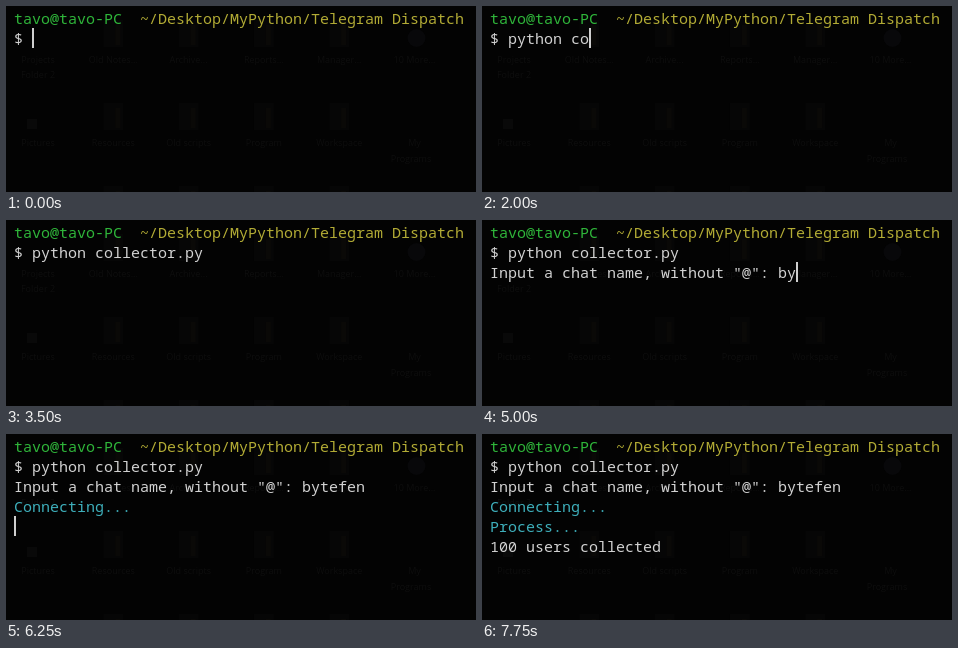
Recreate the animation shown at these times as an HTML page. Size 470 by 186 pixels, loop 8 s.

```html
<!DOCTYPE html>
<html lang="en">
<head>
<meta charset="utf-8">
<title>Terminal session</title>
<style>
  html, body { margin: 0; width: 470px; height: 186px; overflow: hidden; background: #030303; }
  svg { display: block; }
  text { white-space: pre; font: 15px "Noto Sans Mono", "DejaVu Sans Mono", monospace; fill: #d2d2d2; }
  .green { fill: #2fb53a; }
  .gold { fill: #b2ab35; }
  .cyan { fill: #3eafbb; }
  #desk text { font: 9px "Open Sans", sans-serif; fill: #0e0e0e; text-anchor: middle; }
</style>
</head>
<body>
<svg id="stage" width="470" height="186" viewBox="0 0 470 186">
  <g id="desk"></g>
  <g id="term"></g>
  <rect id="cursor" width="2" height="20" fill="#cfcfcf"/>
</svg>
<script>
const LOOP = 8000, LEFT = 8, CHAR = 9, PITCH = 20;
const NS = "http://www.w3.org/2000/svg";
const byId = id => document.getElementById(id);

function add(parent, tag, attrs, content = "") {
  const el = document.createElementNS(NS, tag);
  for (const key in attrs) el.setAttribute(key, attrs[key]);
  el.textContent = content;
  return parent.appendChild(el);
}

// Desktop icons dimly visible through the terminal
const desk = byId("desk");
const labels = [
  ["Projects", "Old Notes...", "Archive...", "Reports...", "Manager...", "10 More..."],
  ["Pictures", "Resources", "Old scripts", "Program", "Workspace", "My"],
  ["", "", "", "", "", ""]
];
labels.forEach((row, r) => row.forEach((label, c) => {
  const x = 32 + c * 75.3, y = 14 + r * 83;
  if (c > 0 && c < 5) {
    add(desk, "rect", { x: x - 10, y, width: 20, height: 27, fill: "#060606" });
    add(desk, "rect", { x: x + 2, y: y + 5, width: 5, height: 20, fill: "#0a0907" });
  } else if (c == 0 && r == 1) {
    add(desk, "rect", { x: x - 11, y: y + 16, width: 10, height: 10, fill: "#090909" });
  } else if (c == 5 && r == 0) {
    add(desk, "circle", { cx: x + 2, cy: y + 18, r: 9, fill: "#08080a" });
  }
  add(desk, "text", { x, y: y + 43 }, label);
}));
add(desk, "text", { x: 32, y: 72 }, "Folder 2");
add(desk, "text", { x: 405, y: 156 }, "Programs");

// Terminal lines
const term = byId("term");
const line = (row, cls, text = "", col = 0) => add(term, "text",
  { x: LEFT + col * CHAR, y: 18 + row * PITCH, class: cls }, text);

line(0, "green", "tavo@tavo-PC");
line(0, "gold", "~/Desktop/MyPython/Telegram Dispatch", 14);
const command = "python collector.py ";
const question = 'Input a chat name, without "@": ';
const chat = "bytefen";
const rows = [1, 2, 3, 4, 5].map(r => line(r, r == 3 || r == 4 ? "cyan" : ""));

// Steps are [time, value] pairs
const commandSteps = [[0, 0], [1250, 3], [1500, 5], [1750, 7], [2000, 9], [2250, 12], [2500, 20]];
const chatSteps = [[0, 0], [4750, 1], [5000, 2], [5500, 3], [5750, 5], [6000, 7]];
const rowSteps = [[0, 1], [3000, 2], [6250, 4], [7000, 5], [7250, 6]];
const blinks = [[500, 1000], [3500, 3750], [4250, 4750], [6500, 7000], [7750, LOOP]];
const at = (steps, t) => steps.filter(s => s[0] <= t).pop()[1];

const cursor = byId("cursor");
function draw(t) {
  const texts = [
    "$ " + command.slice(0, at(commandSteps, t)),
    t < 3750 ? "" : question + chat.slice(0, at(chatSteps, t)),
    t < 6250 ? "" : "Connecting...",
    t < 7000 ? "" : "Process...",
    t < 7250 ? "" : "100 users collected"
  ];
  rows.forEach((el, i) => {
    if (el.textContent != texts[i]) el.textContent = texts[i];
  });
  const row = at(rowSteps, t);
  const col = (texts[row - 1] || "").length;
  cursor.setAttribute("x", LEFT + col * CHAR);
  cursor.setAttribute("y", 2 + row * PITCH);
  cursor.style.opacity = blinks.some(([from, to]) => t >= from && t < to) ? 0 : 1;
}

const start = performance.now();
function tick() {
  draw((performance.now() - start) % LOOP);
  requestAnimationFrame(tick);
}
tick();
</script>
</body>
</html>
```
